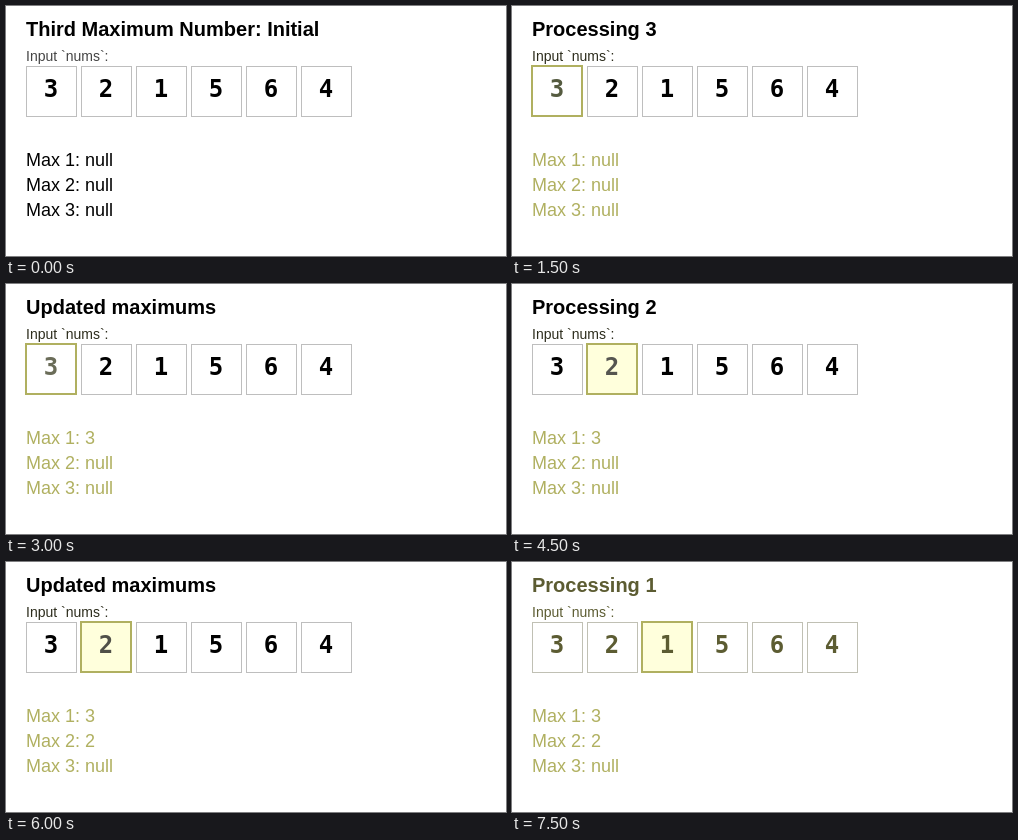
An HTML page with a canvas that plays this animation: 500x250 px, repeating every 8 s.

```html
<!DOCTYPE html>
<html lang="en">
<head>
<meta charset="utf-8">
<title>Third Maximum Number</title>
<style>
  html, body { margin: 0; width: 100%; height: 100%; overflow: hidden; background: #fff; }
  canvas { display: block; }
</style>
</head>
<body>
<canvas id="stage" width="500" height="250"></canvas>
<script>
const ctx = document.getElementById('stage').getContext('2d');
const SANS = '"Liberation Sans", Arial, sans-serif';
const MONO = '"DejaVu Sans Mono", monospace';
const nums = [3, 2, 1, 5, 6, 4];
const OLIVE = '#b0b060', CREAM = '#ffffdc', MOSS = '#5c5c32';
const STEP = 1500, LOOP = 8000;

const base = { ink: '#000', label: '#2c2c1c', border: '#bebebe', accent: OLIVE, fill: '#fff' };
const steps = [
  { title: 'Third Maximum Number: Initial', active: -1, maxes: [], label: '#444', accent: '#000' },
  { title: 'Processing 3', active: 0, maxes: [], digit: '#555b40' },
  { title: 'Updated maximums', active: 0, maxes: [3], digit: '#6a6c58' },
  { title: 'Processing 2', active: 1, maxes: [3], digit: '#555550', fill: CREAM },
  { title: 'Updated maximums', active: 1, maxes: [3, 2], digit: '#505048', fill: CREAM },
  { title: 'Processing 1', active: 2, maxes: [3, 2], digit: MOSS, fill: CREAM,
    ink: MOSS, label: MOSS, border: '#c0c0b4' }
].map(step => ({ ...base, ...step }));

function text(string, x, y, font, color, align = 'left') {
  ctx.font = font;
  ctx.fillStyle = color;
  ctx.textAlign = align;
  ctx.fillText(string, x, y);
}

function cell(step, value, i) {
  const active = i === step.active;
  const x = 20 + i * 55, y = 60, offset = active ? 0 : 0.5;
  ctx.fillStyle = active ? step.fill : '#fff';
  ctx.fillRect(x, y, 50, 50);
  ctx.strokeStyle = active ? OLIVE : step.border;
  ctx.lineWidth = active ? 2 : 1;
  ctx.strokeRect(x + offset, y + offset, 50, 50);
  text(value, x + 25, 91, `bold 24px ${MONO}`, active ? step.digit : step.ink, 'center');
}

function draw(time) {
  const step = steps[Math.floor(time % LOOP / STEP)];
  ctx.fillStyle = '#fff';
  ctx.fillRect(0, 0, 500, 250);
  text(step.title, 20, 30, `bold 20px ${SANS}`, step.ink);
  text('Input `nums`:', 20, 55, `14px ${SANS}`, step.label);
  nums.forEach((value, i) => cell(step, value, i));
  for (let i = 0; i < 3; i++) {
    text(`Max ${i + 1}: ${step.maxes[i] ?? 'null'}`, 20, 160 + i * 25, `18px ${SANS}`, step.accent);
  }
}

const start = performance.now();
function frame() {
  draw(performance.now() - start);
  requestAnimationFrame(frame);
}
frame();
</script>
</body>
</html>
```
